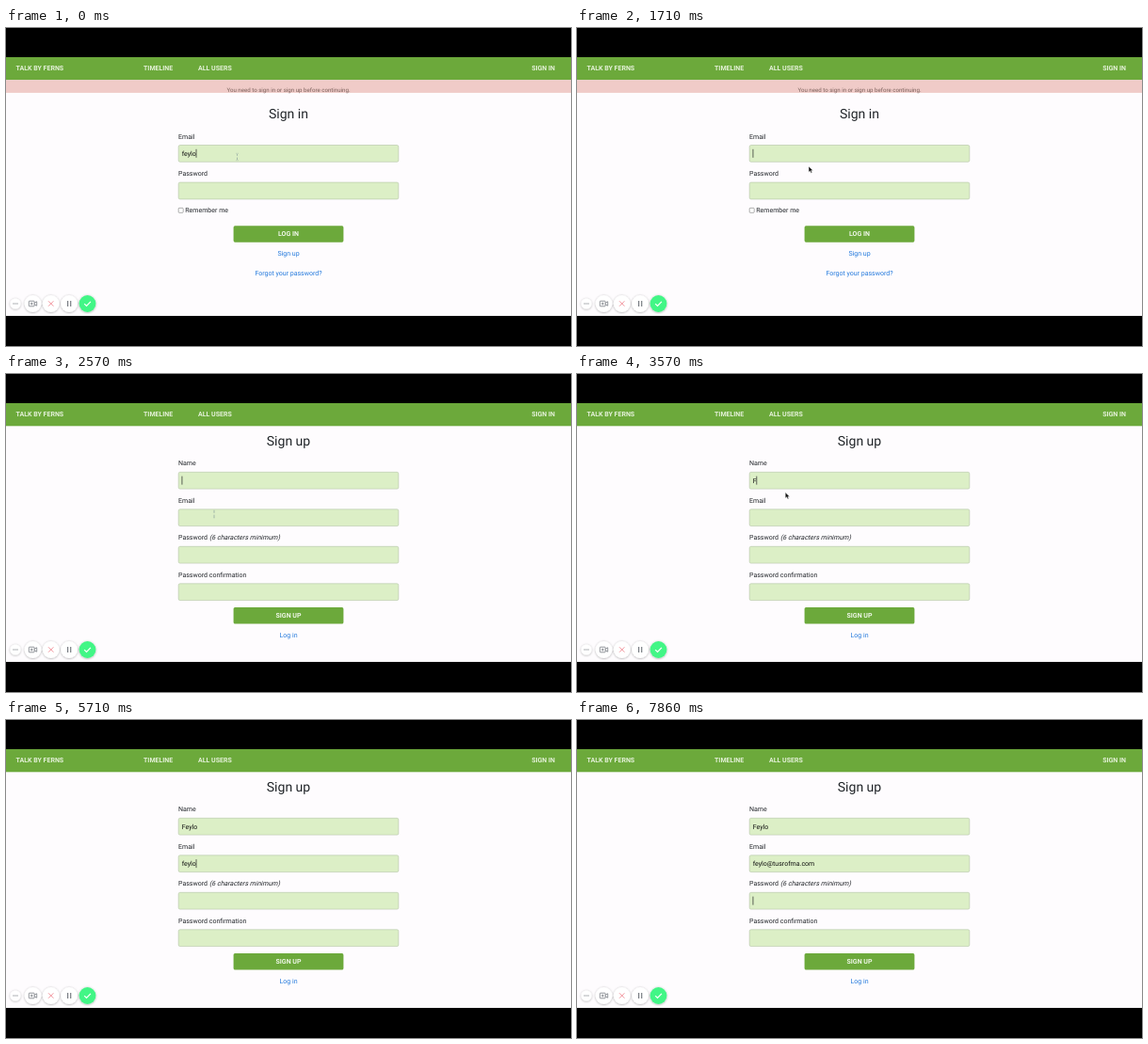
Animation, 600 px wide and 338 px high, one loop 8 s. Source, as an HTML page:

```html
<!DOCTYPE html>
<html lang="en">
<head>
<meta charset="utf-8">
<title>Sign up</title>
<style>
  html, body { margin: 0; width: 100%; height: 100%; overflow: hidden; background: #000; }
  svg { display: block; width: 100%; height: 100%; }
  text { font: 7.03px Roboto, sans-serif; fill: #212529; text-rendering: geometricPrecision; white-space: pre; }
  .nav { font-weight: 700; fill: #e6f2da; }
  .title { font-size: 14.05px; }
  .notice { font-size: 6.15px; fill: #7c625d; }
  .button { font-weight: 700; fill: #f0f7e9; }
  .link { fill: #2178dc; }
  .typed { fill: #111; }
  .mid { text-anchor: middle; }
  .end { text-anchor: end; }
</style>
</head>
<body>
<svg id="stage" viewBox="0 0 600 338">
  <defs>
    <filter id="shadow" x="-30%" y="-30%" width="160%" height="160%">
      <feDropShadow dx="0" dy="0.5" stdDeviation="0.9" flood-color="#000" flood-opacity="0.35"/>
    </filter>
  </defs>
  <rect width="600" height="338" fill="#000"/>
  <rect y="31" width="600" height="275" fill="#fefcfe"/>
  <rect y="31" width="600" height="24.3" fill="#6ca93b"/>
  <text class="nav" x="10.6" y="45.3">TALK BY FERNS</text>
  <text class="nav" x="146" y="45.3">TIMELINE</text>
  <text class="nav" x="204" y="45.3">ALL USERS</text>
  <text class="nav end" x="583" y="45.3">SIGN IN</text>

  <g id="login"></g>
  <g id="signup"></g>
  <rect id="caret" width="0.7" height="9" fill="#222"/>

  <g id="tools">
    <g filter="url(#shadow)" fill="#fff">
      <circle cx="10" cy="293" r="5.6"/>
      <circle cx="28.5" cy="293" r="8.9"/>
      <circle cx="47.7" cy="293" r="8.9"/>
      <circle cx="67.1" cy="293" r="8.9"/>
      <circle cx="86.5" cy="293" r="8.9" fill="#43f686"/>
    </g>
    <g fill="none" stroke="#777c82" stroke-width="0.8">
      <path d="M7.4 293h1.2M9.4 293h1.2M11.4 293h1.2" stroke-width="1"/>
      <rect x="24.3" y="290.2" width="5.8" height="5.6" rx="0.6"/>
      <path d="M30.1 292.2l2.6-1.4v4.4l-2.6-1.4M27.2 291.6v2.8M25.8 293h2.8"/>
      <path d="M45 290.3l5.4 5.4M50.4 290.3l-5.4 5.4" stroke="#ee7580"/>
      <path d="M65.6 290v6M68.7 290v6" stroke-width="1.2"/>
      <path d="M83.2 293.2l2.3 2.3 4.4-4.7" stroke="#fff" stroke-width="1.2"/>
    </g>
  </g>

  <path id="arrow" d="M0 0V6.3L1.5 5L2.5 7.2L3.7 6.7L2.7 4.6H4.7Z" fill="#111" stroke="#fff" stroke-width="0.5"/>
  <path id="beam" d="M-1 -3.7H-0.3M0.3 -3.7H1M0 -3V-1.2M0 0.6V3M-1 3.7H-0.3M0.3 3.7H1" fill="none" stroke="#7d9096" stroke-width="0.6"/>
</svg>
<script>
const FPS = 7, LOOP = 8000;
const NAME = "Feylo", EMAIL = "feylo@tusrofma.com";
const $ = id => document.getElementById(id);

function add(parent, tag, attrs, content = "") {
  const el = document.createElementNS("http://www.w3.org/2000/svg", tag);
  for (const key in attrs) el.setAttribute(key, attrs[key]);
  el.textContent = content;
  return parent.appendChild(el);
}

const label = (g, cls, x, y, content) => add(g, "text", { class: cls, x, y }, content);

// Label above an input; returns the text node that is typed into.
function field(g, name, top) {
  label(g, "", 183, top - 6.7, name);
  add(g, "rect", { x: 183.2, y: top + 0.3, width: 233.6, height: 17.8, rx: 1.6,
    fill: "#dcefc6", stroke: "#b3c3a4", "stroke-width": 0.6 });
  return { typed: label(g, "typed", 186.7, top + 11.5, ""), top };
}

function button(g, top, content) {
  add(g, "rect", { x: 241.6, y: top, width: 116.8, height: 17.4, rx: 1.6, fill: "#6ca93b" });
  label(g, "button mid", 300, top + 11.1, content);
}

function buildLogin(g) {
  add(g, "rect", { y: 55.3, width: 600, height: 13.6, fill: "#f0cbc8" });
  label(g, "notice mid", 300, 67.9, "You need to sign in or sign up before continuing.");
  label(g, "title mid", 300, 96, "Sign in");
  const email = field(g, "Email", 124.2);
  field(g, "Password", 163.8);
  add(g, "rect", { x: 183.2, y: 191.3, width: 5, height: 5, rx: 0.8,
    fill: "#fff", stroke: "#777", "stroke-width": 0.6 });
  label(g, "", 190.3, 196.4, "Remember me");
  button(g, 210.3, "LOG IN");
  label(g, "link mid", 300, 242.3, "Sign up");
  label(g, "link mid", 300, 263.4, "Forgot your password?");
  return email;
}

function buildSignup(g) {
  label(g, "title mid", 300, 76, "Sign up");
  const [name, email, password] = ["Name", "Email", "Password", "Password confirmation"]
    .map((caption, i) => field(g, caption, 104 + i * 39.5));
  // Slanted upright letters, which run wider than the true italic.
  add(g, "text", { transform: `translate(215.9 ${password.top - 6.7}) skewX(-14)` },
    "(6 characters minimum)");
  button(g, 248.1, "SIGN UP");
  label(g, "link mid", 300, 280.2, "Log in");
  return { name, email, password };
}

const loginEmail = buildLogin($("login"));
const form = buildSignup($("signup"));

// Ticks at which each key is pressed.
const eraseKeys = [6, 7, 9, 10, 11];
const nameKeys = [25, 26, 27, 28, 29];
const emailKeys = [34, 35, 36, 37, 40, 41, 42, 44, 45, 46, 47, 48, 49, 50, 51, 53, 53, 54];
const OPENED = 18;
const pressed = (keys, tick) => keys.filter(k => k <= tick).length;

// Pointer stops: tick, x, y.
const stops = [[12, 246, 147], [15, 299, 238], [17, 220.8, 162.6], [18, 221, 149], [23, 221.2, 125.8]];

function pointerAt(tick) {
  if (tick < 3) return [245.5, 137];
  if (tick < 12 || tick >= 34) return null;
  const next = stops.findIndex(s => s[0] > tick);
  if (next < 0) return stops[stops.length - 1].slice(1);
  const [t0, x0, y0] = stops[next - 1], [t1, x1, y1] = stops[next];
  const p = (tick - t0) / (t1 - t0);
  return [x0 + (x1 - x0) * p, y0 + (y1 - y0) * p];
}

const show = (el, on) => el.setAttribute("visibility", on ? "visible" : "hidden");

function placeCaret(input, on) {
  const typed = input.typed;
  const width = typed.textContent ? typed.getComputedTextLength() : 0;
  $("caret").setAttribute("x", 186.6 + width);
  $("caret").setAttribute("y", input.top + 4.6);
  show($("caret"), on);
}

function placePointer(tick) {
  const at = pointerAt(tick);
  const overText = tick < 3 || (tick >= OPENED && at && at[1] > 143);
  show($("arrow"), at && !overText);
  show($("beam"), at && overText);
  if (at) $(overText ? "beam" : "arrow").setAttribute("transform", `translate(${at})`);
}

function draw(ms) {
  // The small lead absorbs tick times rounded to 10 ms.
  const tick = Math.floor(ms * FPS / 1000 + 0.05);
  const onLogin = tick < OPENED;
  show($("login"), onLogin);
  show($("signup"), !onLogin);
  loginEmail.typed.textContent = NAME.toLowerCase().slice(0, 5 - pressed(eraseKeys, tick));
  form.name.typed.textContent = NAME.slice(0, pressed(nameKeys, tick));
  form.email.typed.textContent = EMAIL.slice(0, pressed(emailKeys, tick));
  if (onLogin) placeCaret(loginEmail, tick < 15 && tick !== 6);
  else placeCaret(tick < 31 ? form.name : tick < 55 ? form.email : form.password, true);
  placePointer(tick);
}

const start = performance.now();
function loop() {
  draw((performance.now() - start) % LOOP);
  requestAnimationFrame(loop);
}
loop();
</script>
</body>
</html>
```
